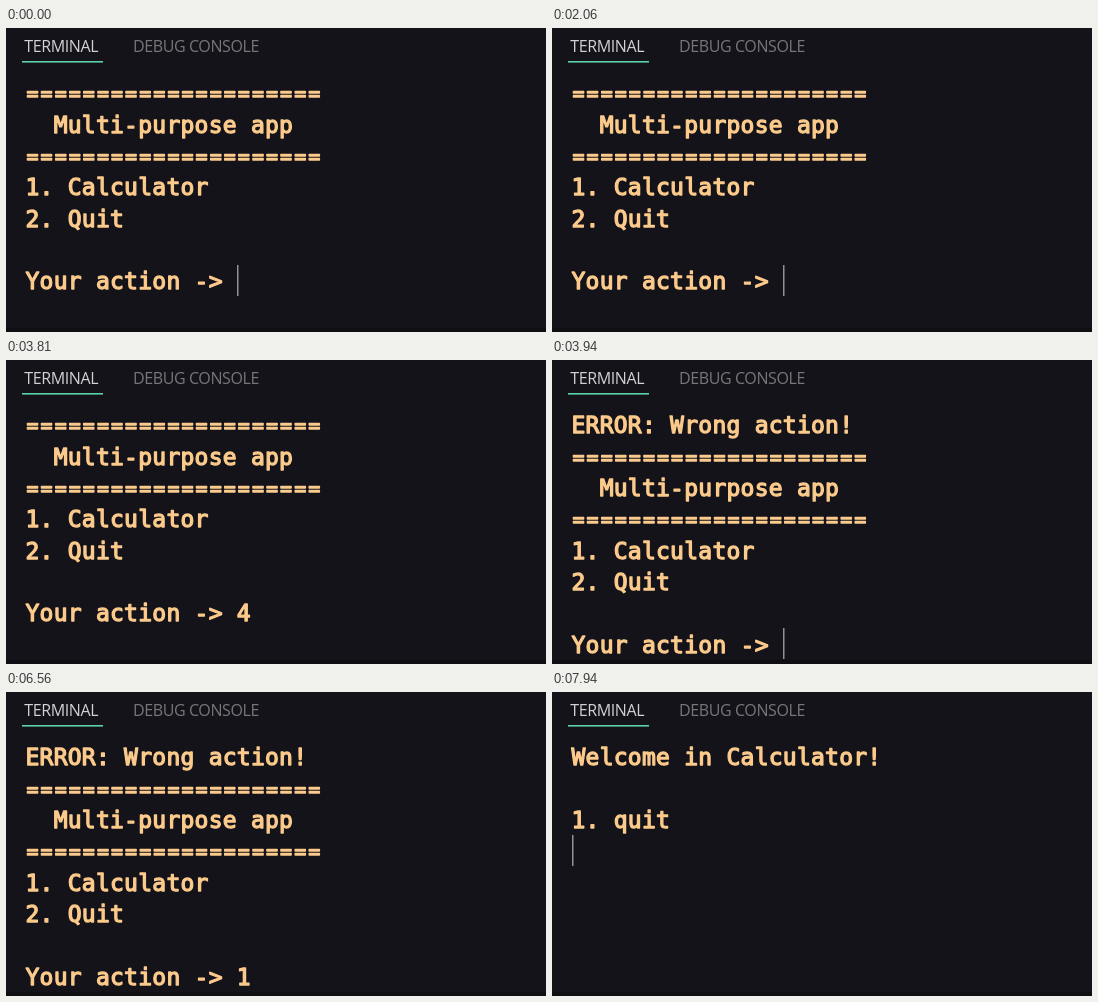
Animation, 540 px wide and 304 px high, one loop 8 s. Source, as an HTML page with a canvas:

```html
<!DOCTYPE html>
<html lang="en">
<head>
<meta charset="utf-8">
<title>Terminal menu</title>
<style>
html, body { margin: 0; width: 100%; height: 100%; overflow: hidden; background: #141319; }
canvas { display: block; width: 540px; height: 304px; }
</style>
</head>
<body>
<canvas id="stage" width="540" height="304"></canvas>
<script>
const ctx = document.getElementById('stage').getContext('2d');
const LOOP = 8000, BLINK = 600;
const LEFT = 19.5, TOP = 48.6, CELL = 14.087, ROW = 31.33;
const EM = 0.602; // advance of the monospace font per pixel of size

const RULE = '='.repeat(21);
const MENU = [RULE, '  Multi-purpose app', RULE, '1. Calculator', '2. Quit', ''];
const PROMPT = 'Your action -> ';
const RETRY = ['ERROR: Wrong action!', ...MENU];
const WELCOME = ['Welcome in Calculator!', '', '1. quit', ''];

// Each state restarts the blink; hold is how long the cursor first stays lit.
const states = [
  { at: 0, lines: [...MENU, PROMPT], hold: 1000 },
  { at: 3100, lines: [...MENU, PROMPT + '4'] },
  { at: 3870, lines: [...MENU, PROMPT + '4', ''] },
  { at: 3935, lines: [...RETRY, PROMPT] },
  { at: 5800, lines: [...RETRY, PROMPT + '1'] },
  { at: 7250, lines: [...RETRY, PROMPT + '1', ''] },
  { at: 7375, lines: WELCOME, hold: 700 }
];

function cursorLit(age, hold = BLINK) {
  return age < hold || Math.floor((age - hold) / BLINK) % 2 === 1;
}

function drawTabs() {
  ctx.font = '16px "Open Sans", sans-serif';
  ctx.letterSpacing = '-0.4px';
  ctx.fillStyle = '#d2d2d4';
  ctx.fillText('TERMINAL', 18.2, 23.7);
  ctx.fillStyle = '#77767b';
  ctx.fillText('DEBUG CONSOLE', 127, 23.7);
  ctx.fillStyle = '#5cd3a8';
  ctx.fillRect(16, 33, 81, 1.6);
}

// Keeps the column grid at any glyph size.
function drawMono(text, size, x, y) {
  ctx.font = `${size}px "DejaVu Sans Mono", monospace`;
  ctx.letterSpacing = `${CELL - size * EM}px`;
  ctx.fillText(text, x, y);
  ctx.strokeText(text, x, y);
}

function drawLines(lines) {
  ctx.fillStyle = ctx.strokeStyle = '#fccb8c';
  ctx.lineWidth = 1.3;
  ctx.lineJoin = 'round';
  lines.forEach((line, i) => {
    const y = TOP + i * ROW + 24.6;
    if (line === RULE) drawMono(line, 20, LEFT + 1, y - 0.9);
    else drawMono(line, 23, LEFT, y);
  });
}

function drawCursor(lines) {
  const row = lines.length - 1;
  const x = Math.round(LEFT + lines[row].length * CELL);
  ctx.fillStyle = '#929196';
  ctx.fillRect(x, Math.round(TOP + row * ROW), 1.5, 31);
}

function draw(t) {
  const state = states.findLast(s => s.at <= t);
  ctx.fillStyle = '#141319';
  ctx.fillRect(0, 0, 540, 304);
  ctx.fillStyle = '#0f0e13';
  ctx.fillRect(0, 300, 540, 4);
  drawTabs();
  drawLines(state.lines);
  if (cursorLit(t - state.at, state.hold)) drawCursor(state.lines);
}

const start = performance.now();
function tick() {
  draw((performance.now() - start) % LOOP);
  requestAnimationFrame(tick);
}
tick();
</script>
</body>
</html>
```
